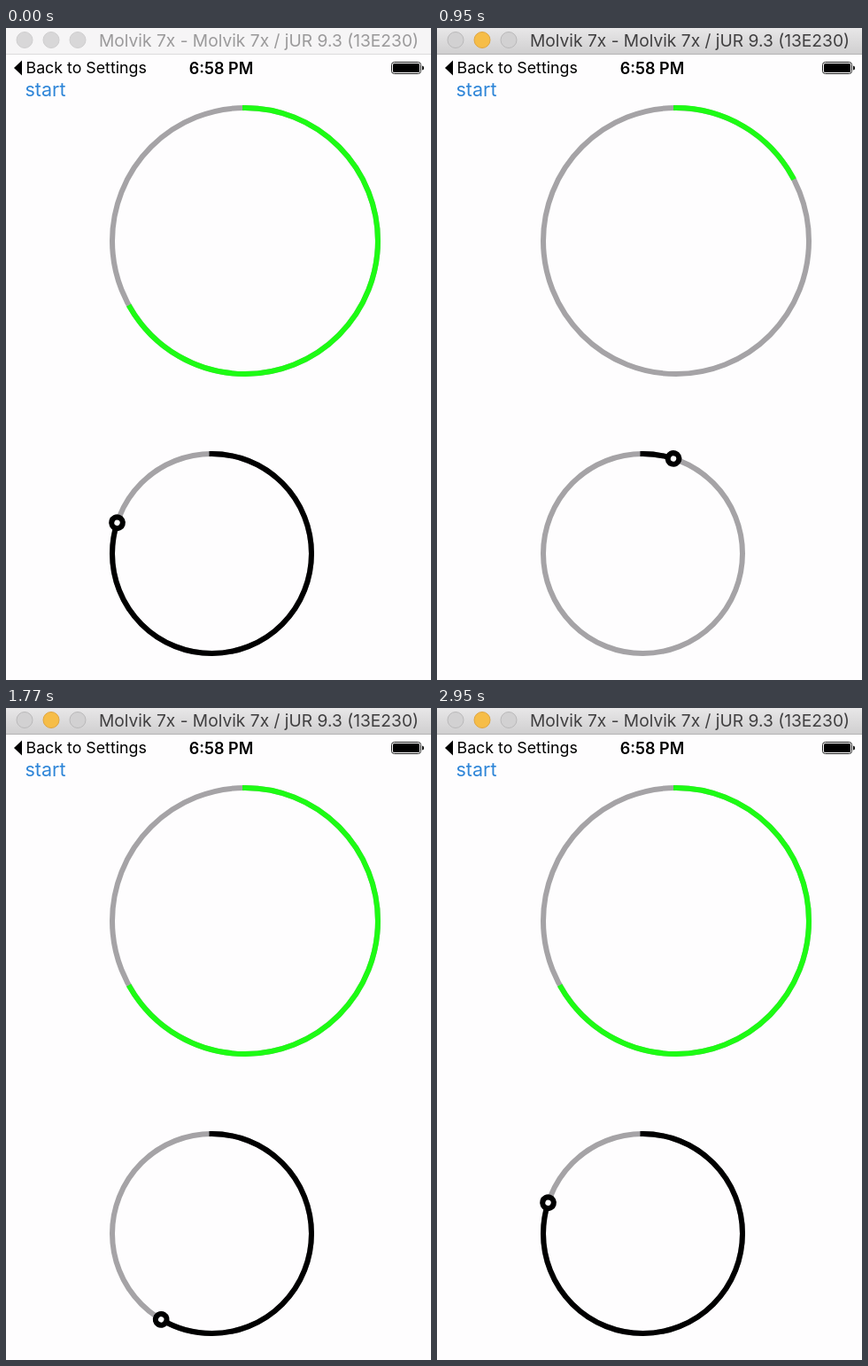
These frames come from a looping animation (480 by 735 pixels, 2990 ms). An HTML page:

```html
<!DOCTYPE html>
<html lang="en">
<head>
<meta charset="utf-8">
<title>Circular progress</title>
<style>
  html, body { margin: 0; width: 100%; height: 100%; overflow: hidden; background: #fefdfe; }
  svg { display: block; width: 480px; height: 735px; font-family: Inter, Roboto, "Liberation Sans", sans-serif; }
  .bar { fill: #f6f5f6; }
  .edge { fill: #dcdbdc; }
  .light { fill: #d8d7d8; stroke: #cfcecf; }
  .title { fill: #9b9a9b; font-size: 19.2px; text-anchor: middle; }
  .active .bar { fill: url(#chrome); }
  .active .edge { fill: #b4b3b4; }
  .active .light { fill: #d2d1d2; stroke: #bab9ba; }
  .active .mid { fill: #f6bd48; stroke: #dfa53f; }
  .active .title { fill: #403f40; }
  .ring { fill: none; stroke-width: 6; }
  .track { stroke: #a5a3a6; }
  .arc { stroke-linecap: square; }
  .green { stroke: #1dfb14; }
  .black { stroke: #000; }
</style>
</head>
<body>
<svg id="stage" viewBox="0 0 480 735">
  <defs>
    <linearGradient id="chrome" x2="0" y2="1">
      <stop stop-color="#e8e7e8"/>
      <stop offset="1" stop-color="#d0cfd0"/>
    </linearGradient>
  </defs>

  <rect class="bar" width="480" height="29"/>
  <rect class="edge" y="29" width="480" height="1"/>
  <circle class="light" cx="21" cy="13.5" r="9"/>
  <circle class="light mid" cx="51" cy="13.5" r="9"/>
  <circle class="light" cx="81" cy="13.5" r="9"/>
  <text class="title" x="285.5" y="20.5">Molvik 7x - Molvik 7x / jUR 9.3 (13E230)</text>

  <path d="M9 45L18 36.5V53.5Z"/>
  <text x="22.5" y="51" font-size="17.8">Back to Settings</text>
  <text x="243" y="51.5" font-size="18" font-weight="600" text-anchor="middle">6:58 PM</text>
  <rect x="435.5" y="38.5" width="33" height="13" rx="3" fill="none" stroke="#222"/>
  <rect x="437" y="40" width="30" height="10" rx="1.5"/>
  <path d="M470 42.5q2 0 2 2.5t-2 2.5z"/>
  <text id="start" x="21.5" y="77" font-size="21.5" fill="#2f86d8">start</text>

  <circle class="ring track" cx="270" cy="240" r="150"/>
  <circle id="ghost" class="ring arc green" cx="270" cy="240" r="150" pathLength="360"
          stroke-dasharray="240 720" transform="rotate(-90 270 240)"/>
  <circle id="green" class="ring arc green" cx="270" cy="240" r="150" pathLength="360"
          transform="rotate(-90 270 240)"/>

  <circle class="ring track" cx="232.5" cy="592.5" r="112.5"/>
  <circle id="black" class="ring arc black" cx="232.5" cy="592.5" r="112.5" pathLength="360"
          transform="rotate(-90 232.5 592.5)"/>
  <g id="thumb">
    <circle cx="232.5" cy="480" r="9.4"/>
    <circle cx="232.5" cy="480" r="3.2" fill="#fff"/>
  </g>
</svg>
<script>
  const LOOP = 2990, FPS = 22, RESET = 500;
  const $ = id => document.getElementById(id);
  const clamp = x => Math.min(1, Math.max(0, x));

  const clock = [[600, 0], [950, 350], [1450, 845], [1770, 1282], [2230, 1712], [2530, 2000]];

  function elapsed(t) {
    for (let i = 1; i < clock.length; i++) {
      const [t0, a] = clock[i - 1], [t1, b] = clock[i];
      if (t <= t1) return a + (b - a) * clamp((t - t0) / (t1 - t0));
    }
    return 2000;
  }

  // cubic-bezier(.42, 0, .58, 1)
  function easeInOut(x) {
    let lo = 0, hi = 1;
    for (let i = 0; i < 24; i++) {
      const s = (lo + hi) / 2, r = 1 - s;
      if (1.26 * r * r * s + 1.74 * r * s * s + s * s * s < x) lo = s; else hi = s;
    }
    return lo * lo * (3 - 2 * lo);
  }

  function setArc(id, angle) {
    $(id).setAttribute('stroke-dasharray', `${Math.max(angle, 0.05)} 720`);
  }

  function buttonOpacity(t) {
    if (t < 360) return 1;
    return t < 590 ? 0.22 : 0.22 + 0.78 * clamp((t - 590) / 250);
  }

  function draw(ms) {
    const tick = Math.floor(ms / 10 + 0.01) * 10;
    const step = Math.floor((tick + 5) * FPS / 1000);
    const t = Math.round(step * 100 / FPS) * 10;
    const time = t < RESET ? 2000 : elapsed(t);
    const angle = 288 * easeInOut(clamp(time / 2000));

    $('stage').classList.toggle('active', t >= 90);
    $('start').setAttribute('opacity', buttonOpacity(t));
    $('ghost').setAttribute('opacity', t >= RESET && t < 640 ? 0.1 : 0);
    setArc('green', 240 * easeInOut(clamp(time / 1000)));
    setArc('black', angle);
    $('thumb').setAttribute('transform', `rotate(${angle} 232.5 592.5)`);
  }

  const begin = performance.now();
  function loop() {
    draw((performance.now() - begin) % LOOP);
    requestAnimationFrame(loop);
  }
  loop();
</script>
</body>
</html>
```
